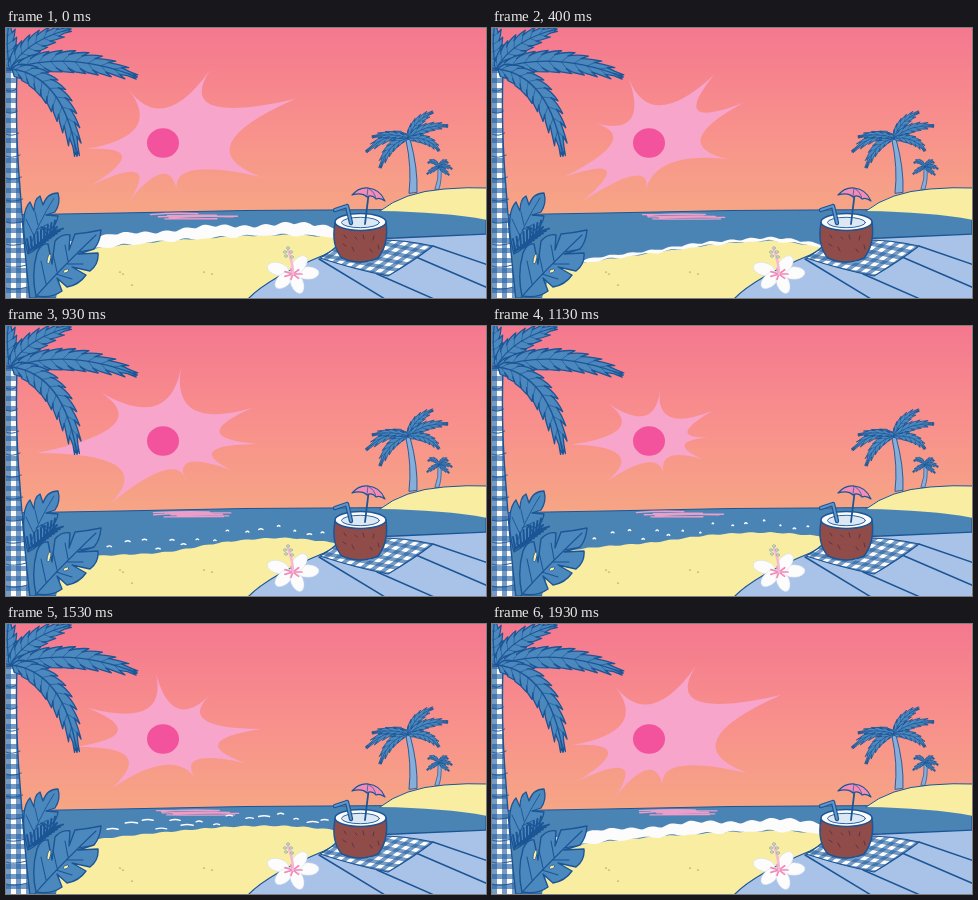
Animation of 480 by 270 pixels, one loop 1990 ms. Source, as an HTML page with a canvas:

```html
<!DOCTYPE html>
<html lang="en">
<head>
<meta charset="utf-8">
<title>Beach sunset</title>
<style>
html, body { margin: 0; width: 100%; height: 100%; overflow: hidden; background: #f58a8b; }
canvas { display: block; width: 480px; height: 270px; }
</style>
</head>
<body>
<canvas id="stage" width="480" height="270"></canvas>
<script>
const g = document.getElementById('stage').getContext('2d');
const W = 480, H = 270, LOOP = 1990, STEPS = 30;
const INK = '#1c5595', BLUE = '#4b88be', SEA = '#4a84b5', SAND = '#f9eda2';
const PINK = '#f7a5ca', HOT = '#f2539c', WHITE = '#fdfcfc', TABLE = '#a9c3e8';

// Steps at which the poses below are reached; the last equals the first.
const KEYS = [0, 6, 10, 14, 19, 23, 29];
const RAYS = [
  [123,62, 204,42, 289,71, 255,149, 172,167, 124,172, 86,157, 81,121],
  [137,51, 222,47, 251,75, 235,131, 153,166, 91,173, 72,149, 102,95],
  [137,48, 224,46, 266,68, 255,136, 157,172, 92,173, 71,146, 97,93],
  [94,66, 175,42, 246,82, 251,118, 225,144, 180,156, 104,178, 31,127],
  [132,86, 163,80, 203,87, 192,107, 201,126, 167,146, 124,139, 112,113],
  [150,50, 204,71, 255,105, 239,139, 191,157, 106,164, 69,123, 82,84]
];
const SHORE_X = [60, 110, 160, 220, 280, 335];
const SHORE = [
  [223, 218, 213, 209, 207, 209],
  [239, 232, 225, 217, 213, 219],
  [237, 231, 225, 216, 213, 219],
  [231, 229, 226, 216, 212, 217],
  [222, 215, 210, 204, 203, 206],
  [219, 213, 208, 203, 202, 206]
];
const FOAM = [[12], [3], [2], [0], [0], [0]];
const DASH = [[0], [0], [0], [0.4], [0.1], [1]];

function mix(poses, step) {
  let i = KEYS.length - 2;
  while (i && KEYS[i] > step) i--;
  const u = Math.min(1, (step - KEYS[i]) / (KEYS[i + 1] - KEYS[i]));
  const a = poses[i], b = poses[(i + 1) % poses.length];
  return a.map((v, k) => v + (b[k] - v) * u);
}

function rnd(seed) {
  const s = Math.sin(seed * 127.1 + 3.7) * 43758.5453;
  return s - Math.floor(s);
}

function draw(path, fill, line, width = 1.2) {
  const p = path instanceof Path2D ? path : new Path2D(path);
  if (fill) { g.fillStyle = fill; g.fill(p); }
  if (line) { g.strokeStyle = line; g.lineWidth = width; g.stroke(p); }
}

function ellipse(x, y, rx, ry, fill, line, width, turn = 0) {
  const p = new Path2D();
  p.ellipse(x, y, rx, ry, turn, 0, 7);
  draw(p, fill, line, width);
}

function gingham(size) {
  const c = document.createElement('canvas');
  c.width = c.height = size * 2;
  const q = c.getContext('2d');
  q.fillStyle = WHITE;
  q.fillRect(0, 0, size * 2, size * 2);
  q.fillStyle = 'rgba(37,99,165,.62)';
  q.fillRect(0, 0, size, size * 2);
  q.fillRect(0, 0, size * 2, size);
  return g.createPattern(c, 'repeat');
}
const trunkCheck = gingham(5), clothCheck = gingham(5);

function curvePoint(a, c, b, t) {
  const s = 1 - t;
  const at = k => s * s * a[k] + 2 * s * t * c[k] + t * t * b[k];
  const dx = s * (c[0] - a[0]) + t * (b[0] - c[0]);
  const dy = s * (c[1] - a[1]) + t * (b[1] - c[1]);
  const d = Math.hypot(dx, dy) || 1;
  return { x: at(0), y: at(1), nx: -dy / d, ny: dx / d };
}

// Palm leaf around a curved spine, with swept notches on both sides.
function frond(a, c, b, w, n, line) {
  const p = new Path2D(), ribs = new Path2D();
  const off = (t, d) => {
    const q = curvePoint(a, c, b, Math.min(1, t));
    return [q.x + q.nx * d, q.y + q.ny * d];
  };
  const wide = t => w * Math.pow(Math.sin(Math.PI * Math.min(1, 0.08 + t * 0.92)), 0.6);
  p.moveTo(...a);
  for (const side of [-1, 1]) {
    for (let k = 0; k < n; k++) {
      const i = side < 0 ? k : n - 1 - k;
      const t = (i + 0.75) / n;
      const tip = off(t + 0.5 / n, side * wide(t));
      const notch = off(t, side * wide(t) * 0.6);
      const out = off(t - 0.4 / n, side * wide(t) * 0.95);
      if (side < 0) {
        p.quadraticCurveTo(...out, ...tip);
        p.lineTo(...notch);
      } else {
        p.lineTo(...notch);
        p.lineTo(...tip);
        p.lineTo(...out);
      }
      ribs.moveTo(...off(t - 0.45 / n, 0));
      ribs.lineTo(...off(t + 0.05 / n, side * wide(t) * 0.6));
    }
    if (side < 0) p.lineTo(...b);
  }
  p.closePath();
  draw(p, BLUE, INK, line);
  draw(ribs, null, INK, line * 0.5);
  draw(`M${a}Q${c} ${b}`, null, INK, line);
}

function sky() {
  const s = g.createLinearGradient(0, 0, 0, 188);
  s.addColorStop(0, '#f4788f');
  s.addColorStop(0.5, '#f88f8c');
  s.addColorStop(1, '#f6a685');
  g.fillStyle = s;
  g.fillRect(0, 0, W, H);
}

function sun(step) {
  const v = mix(RAYS, step), n = v.length / 2, cx = 163, cy = 114;
  const tips = Array.from({ length: n }, (_, i) => [v[2 * i], v[2 * i + 1]]);
  const p = new Path2D();
  p.moveTo(...tips[0]);
  tips.forEach((a, i) => {
    const b = tips[(i + 1) % n];
    const from = Math.atan2(a[1] - cy, a[0] - cx);
    let gap = Math.atan2(b[1] - cy, b[0] - cx) - from;
    if (gap < 0) gap += Math.PI * 2;
    const mean = (Math.hypot(a[0] - cx, a[1] - cy) + Math.hypot(b[0] - cx, b[1] - cy)) / 2;
    const r = mean * Math.max(0.4, 0.64 - 0.15 * gap), mid = from + gap / 2;
    const x = 2 * (cx + r * Math.cos(mid)) - (a[0] + b[0]) / 2;
    const y = 2 * (cy + r * Math.sin(mid)) - (a[1] + b[1]) / 2;
    p.quadraticCurveTo(x, y, ...b);
  });
  draw(p, PINK);
  ellipse(157, 115, 16, 14.7, HOT);
}

function glitter(step) {
  const seed = Math.floor(step / 3) % 5;
  const p = new Path2D();
  for (let i = 0; i < 6; i++) {
    const r = rnd(seed * 9 + i), x = 143 + i * 4 + r * 10;
    const y = 189.5 - Math.abs(i - 2.5) * 0.5 + (i % 3 - 1) * 1.7;
    const len = 44 + rnd(seed + i * 5) * 24;
    p.moveTo(x, y);
    p.quadraticCurveTo(x + len / 2, y - 2.5 + r * 3, x + len, y - 1 + r);
  }
  draw(p, null, '#ec9dc8', 1.3);
}

function water(step) {
  draw('M0 187Q120 185 240 182.5L480 181V270H0Z', SEA, INK, 1);
  glitter(step);
  const shore = mix(SHORE, step), foam = mix(FOAM, step)[0], dash = mix(DASH, step)[0];
  const edge = x => {
    let i = 0;
    while (i < 4 && x > SHORE_X[i + 1]) i++;
    const u = (x - SHORE_X[i]) / (SHORE_X[i + 1] - SHORE_X[i]);
    const s = k => (shore[Math.min(5, k + 1)] - shore[Math.max(0, k - 1)]) / 2;
    const u2 = u * u, u3 = u2 * u;
    return (2 * u3 - 3 * u2 + 1) * shore[i] + (u3 - 2 * u2 + u) * s(i)
      + (3 * u2 - 2 * u3) * shore[i + 1] + (u3 - u2) * s(i + 1)
      + Math.sin(x * 0.31) * 0.5;
  };
  const sand = new Path2D(), surf = new Path2D();
  sand.moveTo(50, H);
  for (let x = 60; x <= 335; x += 3) sand.lineTo(x, edge(x));
  sand.lineTo(335, H);
  draw(sand, SAND);
  if (foam > 0.4) {
    const bump = Math.min(1.8, foam / 3);
    surf.moveTo(60, edge(60));
    for (let x = 60; x <= 335; x += 2) {
      const h = foam * (0.82 + 0.12 * Math.sin(x * 0.07)) + bump * Math.abs(Math.sin(x * 0.16 + 1));
      surf.lineTo(x, edge(x) - h);
    }
    for (let x = 335; x >= 60; x -= 2) {
      surf.lineTo(x, edge(x) + Math.sin(x * 0.2) * Math.min(1, foam / 4));
    }
    draw(surf, WHITE);
  }
  if (dash > 0.05) {
    const p = new Path2D();
    for (let i = 0; i < 15; i++) {
      const x = 100 + i * 15 + rnd(i) * 8, y = edge(x) - 3 - rnd(i + 30) * 11;
      const len = (4 + rnd(i + 60) * 9) * dash;
      p.moveTo(x, y);
      p.quadraticCurveTo(x + len / 2, y - 1.5, x + len, y);
    }
    draw(p, null, WHITE, 1.4);
  }
  for (const [x, y] of [[114, 244], [126, 257], [198, 244], [206, 246], [117, 246]]) {
    ellipse(x, y, 1.2, 0.6, '#a99a6e');
  }
}

function island() {
  draw('M374 183Q398 164 438 161Q462 159 482 160V192Q440 184 374 183Z', SAND);
  draw('M374 183Q398 164 438 161Q462 159 482 160', null, INK, 1);
  draw('M403 165Q406 140 400 112L404 111Q412 140 411 164Z', '#86aedb', INK, 0.9);
  const top = [402, 110];
  frond(top, [386, 100], [360, 124], 4.5, 6, 0.8);
  frond(top, [382, 114], [374, 140], 4.5, 6, 0.8);
  frond(top, [386, 104], [366, 109], 3.5, 5, 0.8);
  frond(top, [408, 92], [427, 84], 4.5, 6, 0.8);
  frond(top, [418, 96], [442, 98], 4.5, 6, 0.8);
  frond(top, [424, 108], [433, 123], 4.5, 6, 0.8);
  draw('M429 161Q433 151 432 140L435 140Q436 152 433 161Z', '#86aedb', INK, 0.7);
  const small = [433, 139];
  for (const [x, y] of [[421, 146], [422, 135], [442, 135], [446, 141], [443, 147]]) {
    frond(small, [(x + 433) / 2, y - 5], [x, y], 2.2, 4, 0.6);
  }
}

function table() {
  draw('M242 271Q262 250 318 227Q350 210 390 210L482 206V272Z', TABLE, INK, 1.3);
  draw('M313 231L379 271M371 246L428 271M410 229L482 260M427 218L482 237', null, INK, 1.5);
}

function napkin() {
  const p = new Path2D('M314 230Q327 223 335 214Q382 208 427 218Q409 232 382 248Q351 242 314 230Z');
  g.save();
  g.clip(p);
  g.transform(1, 0.2, -0.85, 0.62, 330, 212);
  g.fillStyle = clothCheck;
  g.fillRect(-120, -90, 300, 220);
  g.restore();
  draw(p, null, INK, 1.2);
}

function coconut() {
  draw('M329 195Q325 218 336 230Q354 238 372 230Q383 216 380 194Z', '#8f4c49', INK, 1.5);
  ellipse(354.5, 194, 25.5, 8.5, WHITE, INK, 1.5);
  ellipse(354.5, 194.5, 19, 5.2, '#dce9f5', INK, 0.9);
  draw('M345 195L341 178L329 182', null, INK, 4.4);
  draw('M345 195L341 178L329 182', null, '#5f96ca', 2);
  draw('M359 196L363 163', null, INK, 1.8);
  draw('M346 167Q353 159 362 160Q374 161 379 173Q374 169 370 171Q366 166 361 169Q356 164 346 167Z', '#f58bb6', INK, 1.2);
  draw('M362 160L361 168M362 160Q369 164 370 171', null, INK, 0.7);
  draw('M338 207l2 3M337 216l3 2M346 219l2 4M357 207l1 4M368 208l-1 4M364 221l2 3M372 217l1 4M349 209l2 2', null, '#5f3344', 1);
}

function flower() {
  const petals = [[272, 241, 0.25], [278, 252, 2.4], [291, 255, 1.2], [302, 245, 0], [293, 237, -0.9]];
  for (const [x, y, a] of petals) ellipse(x, y, 11, 6.3, WHITE, '#cbd9ea', 0.5, a);
  for (let i = 0; i < 7; i++) {
    const a = i * 0.9;
    draw(`M287 246L${287 + 9 * Math.cos(a)} ${246 + 5.5 * Math.sin(a)}`, null, '#f28bb8', 1.7);
  }
  draw('M287 246Q287 235 282 222', null, '#f6b8d2', 2.5);
  for (const [x, y] of [[279, 224], [282, 220], [285, 224], [280, 228], [286, 229]]) {
    ellipse(x, y, 1.5, 1.3, '#eee6a1', '#6d9ac1', 0.6);
  }
}

function palm() {
  const p = new Path2D('M-3 42H11Q9 102 14 160Q18 220 24 272H-3Z');
  draw(p, trunkCheck, INK, 1.4);
  const rings = new Path2D();
  for (let y = 62; y < 270; y += 22) {
    rings.moveTo(0, y);
    rings.quadraticCurveTo(6, y + 3, 10 + Math.max(0, y - 60) * 0.06, y - 1);
  }
  draw(rings, null, INK, 0.9);
  frond([4, 41], [-1, 20], [3, -6], 10, 6, 1.2);
  frond([4, 41], [20, 12], [65, 1], 10, 8, 1.2);
  frond([5, 41], [63, 22], [131, 49], 11, 10, 1.3);
  frond([6, 41], [58, 48], [71, 128], 12, 10, 1.3);
}

function plants() {
  draw('M22 226Q16 204 18 190Q19 179 24 174L28 183Q28 171 34 168L37 177Q41 165 52 165Q55 175 49 184L40 187L52 188Q51 197 43 202L35 199L41 206Q36 219 22 226Z', BLUE, INK, 1.3);
  draw('M22 224Q32 195 48 170M27 206L20 191M32 197L29 184M30 202L42 196', null, INK, 0.9);
  for (let i = 0; i < 9; i++) {
    const x = 23 + i * 3, y = 222 - i * 2.3;
    draw(`M${x} ${y}l${-2 + i * 0.5} -11M${x} ${y}l10 -3`, null, INK, 2);
  }
  draw('M22 224Q34 216 51 199', null, INK, 2);
  draw('M30 268Q25 246 31 225Q35 215 42 216L46 236L49 213Q56 205 64 207L63 222L69 206Q81 205 95 202Q94 214 88 221L72 226L92 225Q93 236 84 243L66 239L80 247Q73 257 61 259L51 250L56 263Q45 271 30 268Z', BLUE, INK, 1.4);
  draw('M27 272Q49 246 90 207M40 256L35 233M51 244L47 226M62 233L59 217M50 246L66 251M60 236L77 236M72 224L83 222', null, INK, 1.1);
  ellipse(60, 243, 3, 1.6, SAND, INK, 0.8, -0.4);
  ellipse(43, 231, 1.6, 5, SAND, INK, 0.8, 0.2);
}

function frame(now) {
  const step = Math.floor((now % LOOP) / LOOP * STEPS);
  g.lineJoin = g.lineCap = 'round';
  sky();
  sun(step);
  water(step);
  island();
  table();
  napkin();
  coconut();
  flower();
  plants();
  palm();
}

let start = null;
function tick(now) {
  if (start === null) start = now;
  frame(Math.max(0, now - start));
  requestAnimationFrame(tick);
}
frame(0);
requestAnimationFrame(tick);
</script>
</body>
</html>
```
